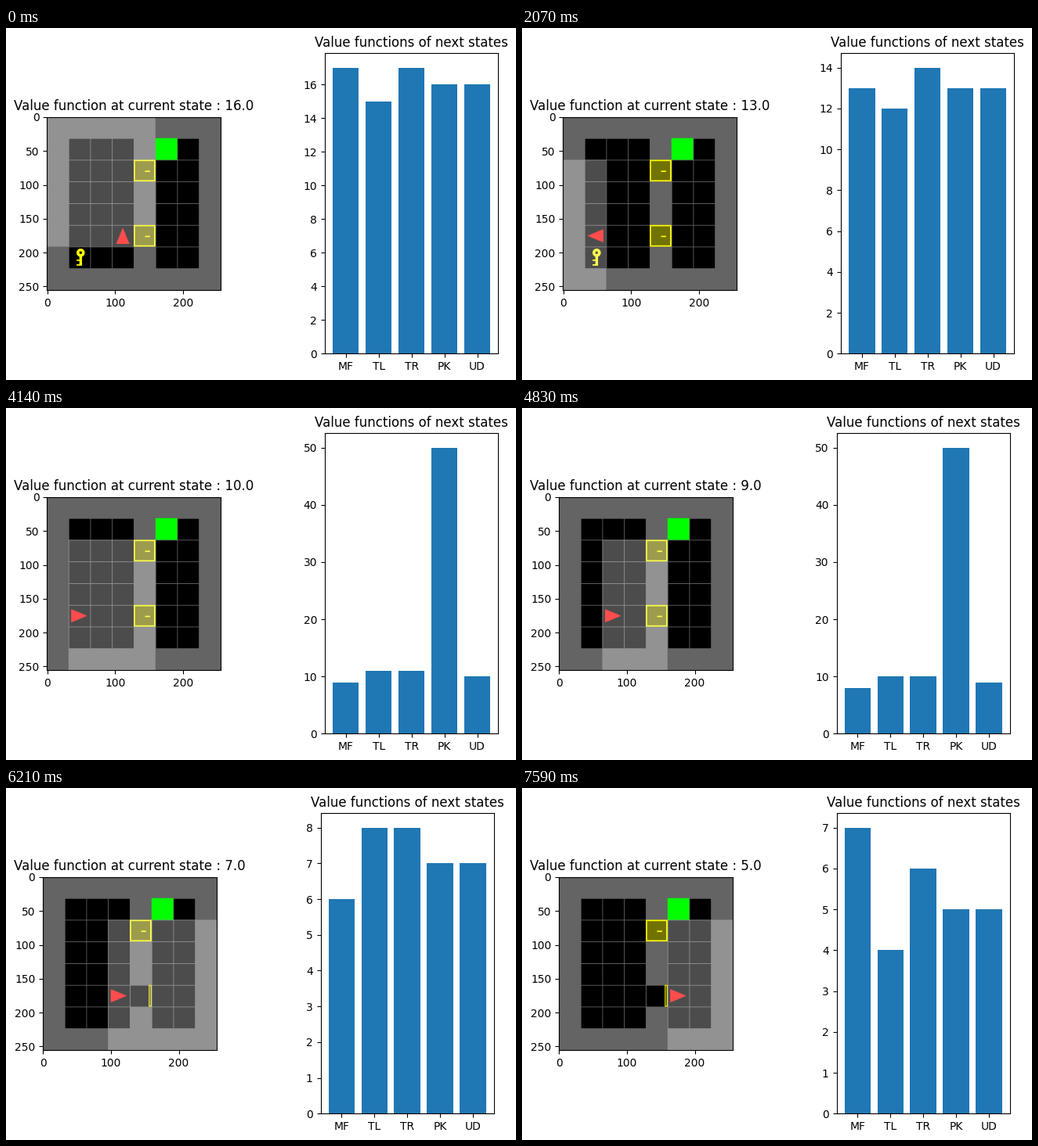
A matplotlib script for the animation above (8 s loop, 651 by 450 pixels).

```python
import numpy as np
import matplotlib.pyplot as plt
from matplotlib.animation import FuncAnimation

W, H, DPI = 651, 450, 100
LOOP, INTERVAL, HOLD = 8000, 40, 690

N, TILE, SUB, VIEW = 8, 32, 3, 7
YELLOW, GREY, GREEN = (255, 255, 0), (100, 100, 100), (0, 255, 0)
RED, BLACK = (255, 0, 0), (0, 0, 0)

DIRS = [(1, 0), (0, 1), (-1, 0), (0, -1)]
UP = 3
DOORS, KEY, GOAL = [(4, 2), (4, 5)], (1, 6), (5, 1)
ACTIONS = ["MF", "TL", "TR", "PK", "UD"]
UNREACHABLE = 50


# --- World: a state is (x, y, heading, key, opened doors) ---

def cell_at(state, pos):
    x, y = pos
    if pos in DOORS:
        return "open" if pos in state[4] else "locked"
    if not (0 < x < N - 1 and 0 < y < N - 1) or x == 4:
        return "wall"
    if pos == GOAL:
        return "goal"
    return "key" if pos == KEY and state[3] == "floor" else None


def act(state, action):
    x, y, heading, key, opened = state
    dx, dy = DIRS[heading]
    front = (x + dx, y + dy)
    ahead = cell_at(state, front)
    if action == "MF" and ahead in (None, "open", "goal"):
        x, y = front
    elif action == "TL":
        heading = (heading - 1) % 4
    elif action == "TR":
        heading = (heading + 1) % 4
    elif action == "PK" and ahead == "key":
        key = "carried"
    elif action == "PK" and key == "carried":
        # A key put down anywhere but its own cell cannot be found again
        key = "floor" if front == KEY else "lost"
    elif action == "UD" and key == "carried" and front in DOORS:
        opened = opened | {front}
    return x, y, heading, key, opened


def steps_to_goal(state):
    """Breadth-first count of actions needed to reach the goal."""
    frontier, seen, steps = [state], {state}, 0
    while frontier:
        if any(s[:2] == GOAL for s in frontier):
            return steps
        fresh = {act(s, a) for s in frontier for a in ACTIONS} - seen
        seen |= fresh
        frontier = list(fresh)
        steps += 1
    return UNREACHABLE


def best_path(state, length):
    path = []
    for _ in range(length):
        after = [act(state, a) for a in ACTIONS]
        values = [steps_to_goal(s) for s in after]
        path.append((state, steps_to_goal(state), values))
        state = after[int(np.argmin(values))]
    return path


def visible_cells(state):
    """Cells seen by the agent, spreading row by row away from it."""
    x, y, heading = state[:3]
    fx, fy = DIRS[heading]
    half = VIEW // 2

    def cell(i, j):
        ahead, side = VIEW - 1 - j, i - half
        return x + fx * ahead - fy * side, y + fy * ahead + fx * side

    seen = {(half, VIEW - 1)}
    for j in reversed(range(VIEW)):
        for order, d in ((range(VIEW - 1), 1), (range(VIEW - 1, 0, -1), -1)):
            for i in order:
                blocked = cell_at(state, cell(i, j)) in ("wall", "locked")
                if (i, j) in seen and not blocked:
                    seen |= {(i + d, j), (i + d, j - 1), (i, j - 1)}
    return {cell(i, j) for i, j in seen if j >= 0}


# --- Tile drawing in unit coordinates ---

axis = (np.arange(TILE * SUB) + 0.5) / (TILE * SUB)
X, Y = np.meshgrid(axis, axis)


def rect(x0, x1, y0, y1):
    return (X >= x0) & (X <= x1) & (Y >= y0) & (Y <= y1)


def circle(cx, cy, r):
    return (X - cx) ** 2 + (Y - cy) ** 2 <= r * r


def triangle(heading):
    c, s = DIRS[heading]
    u = (X - 0.5) * c + (Y - 0.5) * s + 0.5
    v = (Y - 0.5) * c - (X - 0.5) * s
    return (u >= 0.12) & (np.abs(v) <= 0.31 * (0.87 - u) / 0.75)


def draw_tile(kind, heading, lit):
    img = np.zeros((TILE * SUB, TILE * SUB, 3), np.uint8)
    img[rect(0, 0.031, 0, 1) | rect(0, 1, 0, 0.031)] = GREY
    if kind == "wall":
        img[:] = GREY
    elif kind == "goal":
        img[:] = GREEN
    elif kind == "locked":
        img[:] = YELLOW
        img[rect(0.06, 0.94, 0.06, 0.94)] = (114, 114, 0)
        img[rect(0.52, 0.75, 0.50, 0.56)] = YELLOW
    elif kind == "open":
        img[rect(0.88, 1, 0, 1)] = YELLOW
        img[rect(0.92, 0.96, 0.04, 0.96)] = BLACK
    elif kind == "key":
        img[rect(0.50, 0.63, 0.31, 0.88)] = YELLOW
        img[rect(0.38, 0.50, 0.59, 0.66)] = YELLOW
        img[rect(0.38, 0.50, 0.81, 0.88)] = YELLOW
        img[circle(0.56, 0.28, 0.19)] = YELLOW
        img[circle(0.56, 0.28, 0.064)] = BLACK
    if heading is not None:
        img[triangle(heading)] = RED
    if lit:
        img = (img + 0.3 * (255.0 - img)).astype(np.uint8)
    return img.reshape(TILE, SUB, TILE, SUB, 3).mean(axis=(1, 3))


def draw_world(state):
    seen = visible_cells(state)
    img = np.zeros((N * TILE, N * TILE, 3), np.uint8)
    for x in range(N):
        for y in range(N):
            heading = state[2] if (x, y) == state[:2] else None
            tile = draw_tile(cell_at(state, (x, y)), heading, (x, y) in seen)
            img[y * TILE:(y + 1) * TILE, x * TILE:(x + 1) * TILE] = tile
    return img


# --- Layout in pixels, y measured downwards ---

MARGIN, BOTTOM, HEIGHT = 10, 416.335, 384
WIDTH = 576 / 2.6
PITCH = 1.6 * WIDTH


def place(ax, left, bottom, width, height):
    ax.set_position([left / W, 1 - bottom / H, width / W, height / H])


path = best_path((3, 5, UP, "floor", frozenset()), -(-LOOP // HOLD))
images = [draw_world(state) for state, _, _ in path]

fig = plt.figure(figsize=(W / DPI, H / DPI), dpi=DPI, facecolor="white")
grid_ax = fig.add_axes([0.1, 0.2, 0.3, 0.5])
bar_ax = fig.add_axes([0.6, 0.1, 0.3, 0.8])
picture = grid_ax.imshow(images[0], aspect="auto")
bars = bar_ax.bar(ACTIONS, path[0][2])
bar_ax.set_title("Value functions of next states")


def update(frame):
    step = ((frame + 1) * INTERVAL - 1) // HOLD
    _, value, after = path[step]

    # The left title starts at the margin; both plots follow its centre
    title = grid_ax.set_title(f"Value function at current state : {value:.1f}")
    left = MARGIN + (title.get_window_extent().width - WIDTH) / 2
    place(grid_ax, left, BOTTOM - (HEIGHT - WIDTH) / 2, WIDTH, WIDTH)
    place(bar_ax, left + PITCH, BOTTOM, WIDTH, HEIGHT)

    picture.set_data(images[step])
    for bar, v in zip(bars, after):
        bar.set_height(v)
    bar_ax.set_ylim(0, max(after) * 1.05)
    return [picture, *bars]


anim = FuncAnimation(fig, update, frames=LOOP // INTERVAL, interval=INTERVAL,
                     repeat=True, repeat_delay=0, blit=False)
plt.show()
```
